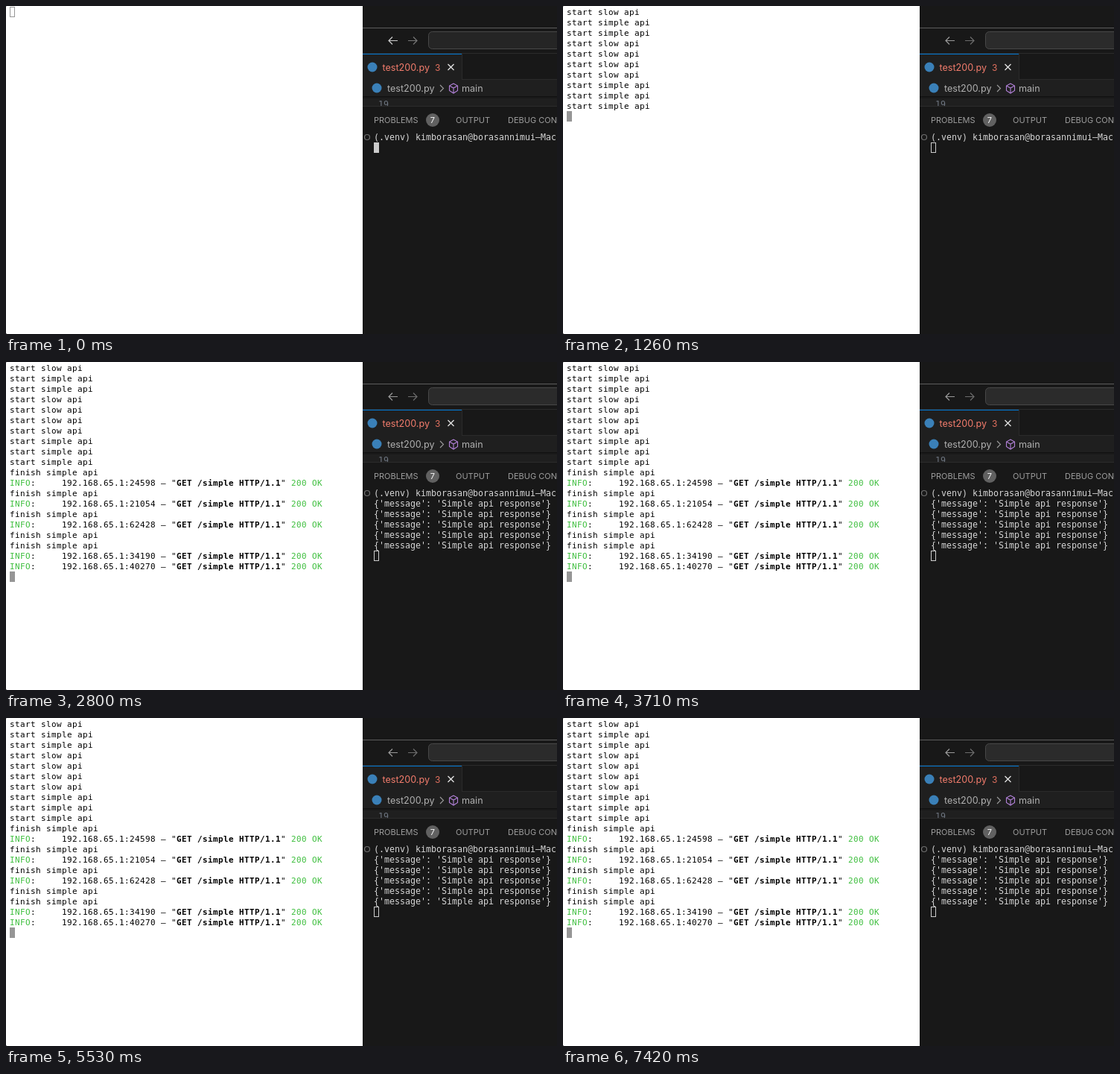
Animation, 740 px wide and 440 px high, one loop 8 s. Source, as an HTML page with a canvas:

```html
<!DOCTYPE html>
<html lang="en">
<head>
<meta charset="utf-8">
<title>Server log and client terminal</title>
<style>
html, body { margin: 0; width: 100%; height: 100%; overflow: hidden; background: #fff; }
canvas { display: block; }
</style>
</head>
<body>
<canvas id="stage" width="740" height="440"></canvas>
<script>
const ctx = document.getElementById('stage').getContext('2d');
const LOOP = 8000, FOCUS = 70, STARTED = 280, FINISHED = 1400;
const ROW = 14, CELL = 7, SPLIT = 479;
const MONO = '"DejaVu Sans Mono", monospace';
const UI = 'Inter, "Open Sans", sans-serif';
const GREEN = '#3fbf3f';

const calls = ['slow', 'simple', 'simple', 'slow', 'slow', 'slow', 'slow', 'simple', 'simple', 'simple'];
// A port logs a request; 0 logs a finished call.
const results = [0, 24598, 0, 21054, 0, 62428, 0, 0, 34190, 40270];

function rect(x, y, w, h, color) {
  ctx.fillStyle = color;
  ctx.fillRect(x, y, w, h);
}

function text(str, x, y, font, color, spacing = 0) {
  ctx.font = font;
  ctx.letterSpacing = spacing + 'px';
  ctx.fillStyle = color;
  ctx.fillText(str, x, y);
}

function dot(x, y, r, color) {
  ctx.fillStyle = color;
  ctx.beginPath();
  ctx.arc(x, y, r, 0, Math.PI * 2);
  ctx.fill();
}

// Each path is a flat list x, y, x, y, ...
function lines(color, width, ...paths) {
  ctx.strokeStyle = color;
  ctx.lineWidth = width;
  ctx.beginPath();
  for (const p of paths) {
    ctx.moveTo(p[0], p[1]);
    for (let i = 2; i < p.length; i += 2) ctx.lineTo(p[i], p[i + 1]);
  }
  ctx.stroke();
}

function cursor(x, y, filled, color) {
  if (filled) return rect(x, y, CELL, ROW, color);
  ctx.strokeStyle = color;
  ctx.lineWidth = 1;
  ctx.strokeRect(x + 0.5, y + 0.5, CELL - 1, ROW - 1);
}

function logText(str, col, row, color = '#000', weight = '') {
  text(str, 5 + col * CELL, 12 + row * ROW, `${weight} 11px ${MONO}`, color, 0.378);
}

function logRequest(port, row) {
  logText('INFO', 0, row, GREEN);
  logText(':', 4, row);
  logText(`192.168.65.1:${port} – "`, 10, row);
  logText('GET /simple HTTP/1.1', 32, row, '#000', 'bold');
  logText('"', 52, row);
  logText('200 OK', 54, row, GREEN);
}

function drawLog(t) {
  rect(0, 0, SPLIT, 440, '#fff');
  rect(0, 439, 1, 1, '#777');
  rect(0, 0, 1, 1, '#bbb');
  let row = 0;
  if (t >= STARTED) for (const name of calls) logText(`start ${name} api`, 0, row++);
  if (t >= FINISHED) {
    for (const port of results) {
      if (port) logRequest(port, row++);
      else logText('finish simple api', 0, row++);
    }
  }
  cursor(5, 1 + row * ROW, t >= FOCUS, '#969696');
}

function arrow(x, dir, color) {
  const y = 46.5, tip = x + dir * 6;
  lines(color, 1.2, [x - dir * 6, y, tip, y], [tip - dir * 5, y - 5, tip, y, tip - dir * 5, y + 5]);
}

function cube(x, y) {
  lines('#b180d7', 1.1,
    [x, y - 6.5, x + 5.5, y - 3.5, x + 5.5, y + 3, x, y + 6.5, x - 5.5, y + 3, x - 5.5, y - 3.5, x, y - 6.5],
    [x - 5.5, y - 3.5, x, y - 0.5, x + 5.5, y - 3.5], [x, y - 0.5, x, y + 6.5]);
}

function drawEditor(active) {
  rect(SPLIT, 0, 261, 440, '#181818');
  rect(SPLIT, 29, 261, 1, '#5c5c5c');
  arrow(520, -1, active ? '#cccccc' : '#999999');
  arrow(546, 1, active ? '#777777' : '#6c6c6c');

  ctx.beginPath();
  ctx.roundRect(567.5, 34.5, 200, 23, 5);
  ctx.fillStyle = active ? '#252525' : '#2b2b2b';
  ctx.fill();
  ctx.strokeStyle = '#484848';
  ctx.lineWidth = 1;
  ctx.stroke();

  // Tab strip and breadcrumb
  rect(SPLIT, 63, 261, 1, '#2b2b2b');
  rect(SPLIT, 64, 133, 35, '#1f1f1f');
  rect(SPLIT, 64, 133, 1, '#0078d4');
  rect(612, 64, 1, 34, '#2b2b2b');
  rect(612, 98, 128, 1, '#2b2b2b');
  rect(SPLIT, 99, 261, 35, '#1f1f1f');
  dot(492, 82, 6.5, '#3a80b8');
  text('test200.py', 505.5, 86.5, `12.6px ${UI}`, '#f27c6c');
  text('3', 576, 86.5, `12px ${UI}`, '#e0705f');
  lines('#e4e4e4', 1.3, [593.5, 78, 601.5, 86], [601.5, 78, 593.5, 86]);
  dot(498, 110, 6.5, '#3a80b8');
  text('test200.py', 512, 115, `12.6px ${UI}`, '#b0b0b0');
  lines('#9d9d9d', 1.1, [583, 106, 587.5, 110.5, 583, 115]);
  cube(601, 110.5);
  text('main', 612, 115, `12.6px ${UI}`, '#b0b0b0');

  // Sliver of code above the panel
  rect(SPLIT, 121, 261, 1, '#111');
  rect(SPLIT, 122, 261, 2, '#191919');
  ctx.save();
  ctx.beginPath();
  ctx.rect(SPLIT, 122, 261, 12);
  ctx.clip();
  text('19', 500, 136, `11.63px ${MONO}`, '#6e7681');
  ctx.restore();
  rect(SPLIT, 134, 261, 1, '#2b2b2b');

  const label = `11px ${UI}`;
  text('PROBLEMS', 494, 157, label, '#9d9d9d');
  dot(573, 153, 9, '#616161');
  text('7', 569.8, 157, label, '#f8f8f8');
  text('OUTPUT', 604, 157, label, '#9d9d9d');
  text('DEBUG CONSOLE', 674, 157, label, '#9d9d9d');
}

function drawShell(t) {
  const print = (str, row) => text(str, 494, 180 + row * ROW, `11.63px ${MONO}`, '#d6d6d6');
  ctx.beginPath();
  ctx.arc(485, 176, 3.5, 0, Math.PI * 2);
  ctx.strokeStyle = '#6f6f6f';
  ctx.lineWidth = 1.2;
  ctx.stroke();
  print('(.venv) kimborasan@borasannimui–Mac', 0);
  const count = t >= FINISHED ? 5 : 0;
  for (let i = 1; i <= count; i++) print("{'message': 'Simple api response'}", i);
  cursor(494, 183 + count * ROW, t < FOCUS, '#cccccc');
}

function draw(t) {
  drawLog(t);
  drawEditor(t < FOCUS);
  drawShell(t);
}

const begin = performance.now();
function frame() {
  draw((performance.now() - begin) % LOOP);
  requestAnimationFrame(frame);
}
frame();
</script>
</body>
</html>
```
